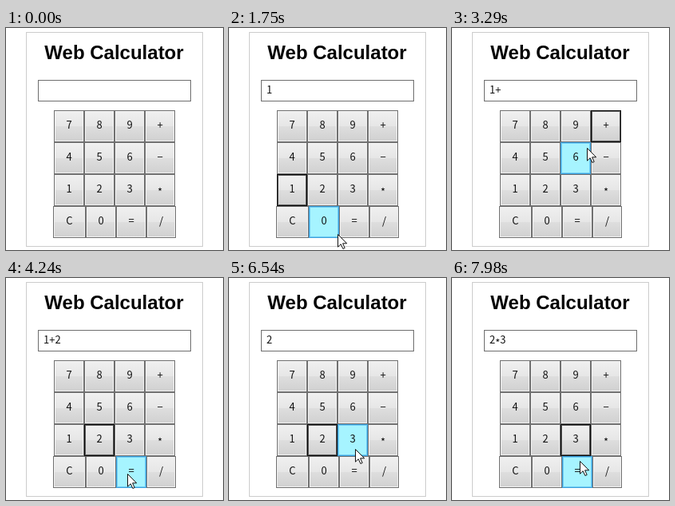
Recreate the animation shown at these times as an HTML page. Size 272x278 px, loop 8000 ms.

```html
<!DOCTYPE html>
<html lang="en">
<head>
<meta charset="utf-8">
<title>Web Calculator</title>
<style>
  html, body { margin: 0; width: 100%; height: 100%; overflow: hidden; background: #fff; }
  svg { display: block; width: 272px; height: 278px; }
  .title { font: bold 24px "Liberation Sans", Arial, sans-serif; text-anchor: middle; }
  .sign { font: 300 13px "Noto Sans CJK KR", "Noto Sans CJK JP", "Noto Sans CJK SC", "Noto Sans", sans-serif; fill: #111; }
  .key .sign { text-anchor: middle; }
  .panel { fill: #fff; stroke: #ccc; }
  .field { fill: #fff; stroke: #6e6e6e; }
  .face { fill: url(#metal); stroke: #707070; }
  .rim { fill: none; stroke: #f3f3f3; }
  .hover .face { fill: #a6f4ff; stroke: #3c9fdb; }
  .hover .rim { stroke: #6fcdf4; }
  .focus .face { stroke: #0c0c0c; }
  .focus .rim { stroke: #5a5a5a; }
  .focus.hover .face { stroke: #0b2034; }
  .focus.hover .rim { stroke: #174f78; }
</style>
</head>
<body>
<svg viewBox="0 0 272 278">
  <defs>
    <linearGradient id="metal" x1="0" y1="0" x2="0" y2="1">
      <stop offset="0" stop-color="#f0f0f0"/>
      <stop offset=".5" stop-color="#e6e6e6"/>
      <stop offset=".5" stop-color="#dedede"/>
      <stop offset="1" stop-color="#d0d0d0"/>
    </linearGradient>
  </defs>
  <rect class="panel" x="25.5" y="5.5" width="221" height="268"/>
  <text class="title" x="135.5" y="39">Web Calculator</text>
  <rect class="field" x="40.5" y="65.5" width="191" height="26"/>
  <text class="sign" id="entry" x="47" y="82"></text>
  <g id="keys"></g>
  <path id="cursor" d="M.5 .5V16.2L4.2 12.7L6.9 18.5L9.2 17.5L6.6 11.8H11.7Z"
        fill="#fff" stroke="#111" stroke-linejoin="round"/>
</svg>
<script>
const LOOP = 8000, TICK = 95;
const NS = "http://www.w3.org/2000/svg";
const entry = document.getElementById("entry");
const cursor = document.getElementById("cursor");
const keyLayer = document.getElementById("keys");

function add(parent, name, attrs) {
  const node = document.createElementNS(NS, name);
  for (const k in attrs) node.setAttribute(k, attrs[k]);
  return parent.appendChild(node);
}

// The asterisk is lowered to mid height; the minus is as wide as the plus.
function write(node, text) {
  node.textContent = "";
  let low = 0;
  for (const ch of text) {
    const want = ch === "*" ? 3.5 : 0;
    add(node, "tspan", { dy: want - low }).textContent = ch === "-" ? "\u2212" : ch;
    low = want;
  }
}

const keys = ["789+", "456-", "123*", "C0=/"].flatMap((row, r) => [...row].map((label, c) => {
  // The wider C pushes the rest of the last row to the right.
  const last = r === 3;
  const x = 60 + 38 * c + (last ? (c ? 2 : -1) : 0);
  const y = 103 + 40 * r, w = last && !c ? 41 : last && c === 3 ? 37 : 38, h = 40;
  const g = add(keyLayer, "g", { class: "key" });
  add(g, "rect", { class: "face", x: x + .5, y: y + .5, width: w - 1, height: h - 1 });
  add(g, "rect", { class: "rim", x: x + 1.5, y: y + 1.5, width: w - 3, height: h - 3 });
  write(add(g, "text", { class: "sign", x: x + w / 2, y: y + 23 }), label);
  return { label, x, y, w, h, g };
}));

// Each glide starts where the one before ended; sag bows it downwards.
const glides = [
  { from: 490, to: 870, x: 76, y: 210 },
  { from: 1360, to: 2120, x: 184, y: 217, sag: 45 },
  { from: 2210, to: 2790, x: 190, y: 122, sag: 24 },
  { from: 3180, to: 3750, x: 116, y: 221 },
  { from: 3940, to: 4240, x: 152, y: 245 },
  { from: 4910, to: 5390, x: 80, y: 253, sag: 10 },
  { from: 5780, to: 6170, x: 121, y: 215 },
  { from: 6450, to: 6540, x: 158, y: 214 },
  { from: 6640, to: 6840, x: 187, y: 207 },
  { from: 7330, to: 7520, x: 157, y: 211 },
  { from: 7790, to: 7980, x: 160, y: 229 }
];
const entrance = { x: 91, y: 251 };

const presses = [[1160, "1"], [2990, "+"], [3840, "2"], [4430, "="],
  [5590, "C"], [6360, "2"], [7040, "*"], [7610, "3"]];

function pointer(t) {
  const i = glides.filter(g => g.from <= t).length - 1;
  if (i < 0) return null;
  const a = glides[i - 1] || entrance, b = glides[i];
  const gaps = Math.round((b.to - b.from) / TICK);
  const step = Math.floor((t - b.from) / (b.to - b.from) * gaps + .001) + 1;
  const u = Math.min(1, step / (gaps + 1));
  return {
    x: Math.round(a.x + (b.x - a.x) * u),
    y: Math.round(a.y + (b.y - a.y) * u + (b.sag || 0) * 4 * u * (1 - u))
  };
}

function sum(text) {
  const [a, b] = text.split("+").map(Number);
  return String(a + b);
}

function press(text, key) {
  if (key === "C") return "";
  return key === "=" ? sum(text) : text + key;
}

let shown = null;
function draw(t) {
  const p = pointer(t);
  const pressed = presses.filter(s => s[0] <= t).map(s => s[1]);
  const focus = pressed[pressed.length - 1];
  const text = pressed.reduce(press, "");
  if (text !== shown) write(entry, shown = text);
  for (const k of keys) {
    const over = p && p.x >= k.x && p.x < k.x + k.w && p.y >= k.y && p.y < k.y + k.h;
    k.g.classList.toggle("hover", !!over);
    k.g.classList.toggle("focus", k.label === focus);
  }
  cursor.setAttribute("visibility", p ? "visible" : "hidden");
  if (p) cursor.setAttribute("transform", `translate(${p.x} ${p.y})`);
}

const start = performance.now();
function tick() {
  draw((performance.now() - start) % LOOP);
  requestAnimationFrame(tick);
}
tick();
</script>
</body>
</html>
```
